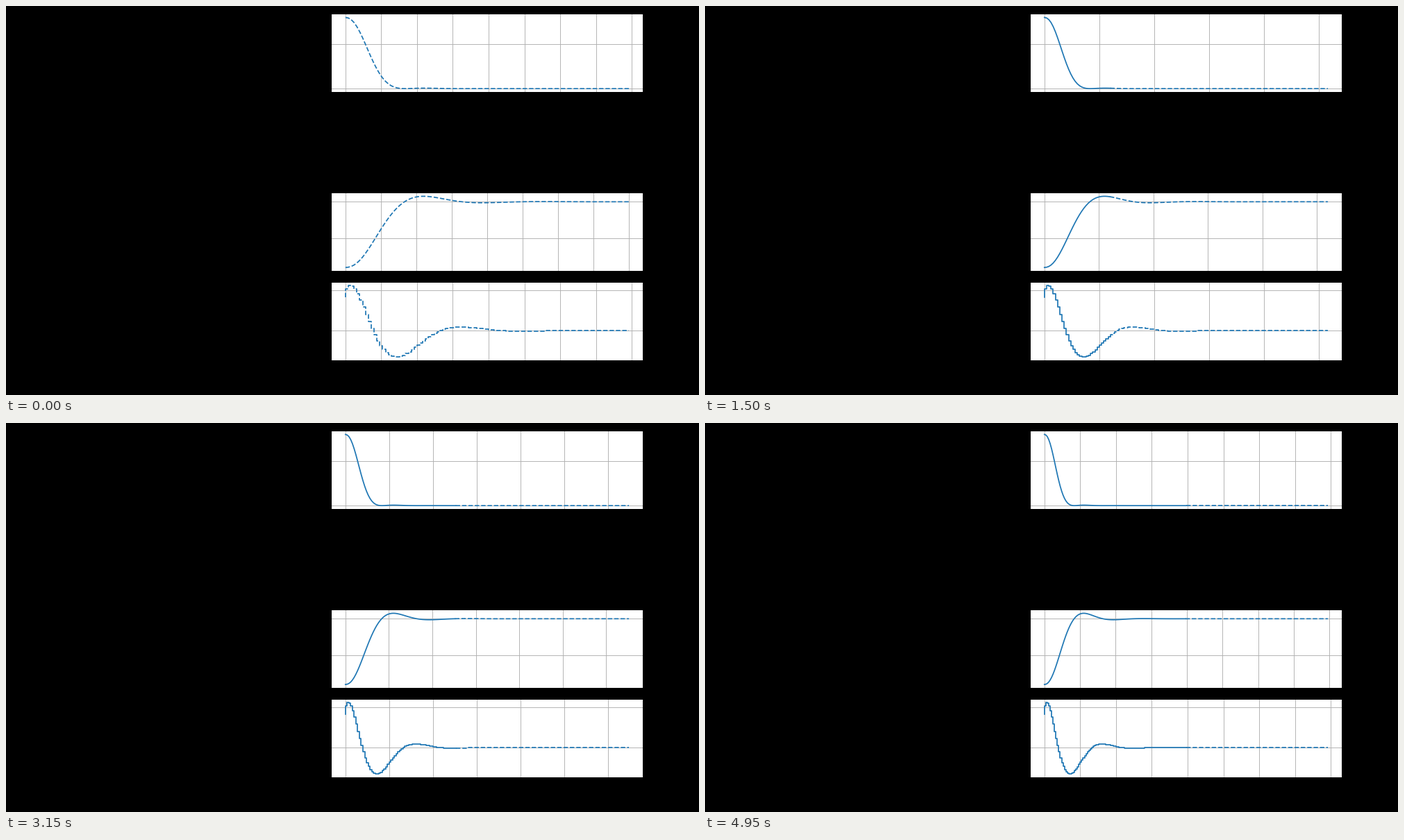
Recreate the animation shown at these times as a matplotlib script. Size 998x561 px, loop 5 s.

```python
import numpy as np
import matplotlib.pyplot as plt
from matplotlib.animation import FuncAnimation
from matplotlib.ticker import MaxNLocator

W, H, DPI = 998, 561, 64
FRAMES, INTERVAL = 100, 50
HORIZON = 100
DT, GRAVITY = 0.04, 9.8
X0, U0 = -1.79, 0.82
RATE_WEIGHT = 10.0


def pt(px):
    return px * 72 / DPI


def feedback_gain(A, B):
    """Steady gain that minimises the sum of x^2 + RATE_WEIGHT * du^2."""
    Q = np.diag([1.0, 0.0, 0.0])
    P = Q.copy()
    for _ in range(600):
        K = (B @ P @ A) / (RATE_WEIGHT + B @ P @ B)
        P = Q + A.T @ P @ (A - np.outer(B, K))
    return K


def simulate(steps):
    """Double integrator whose input is moved by optimal increments."""
    h, s = 0.5 * GRAVITY * DT**2, GRAVITY * DT
    A = np.array([[1, DT, h], [0, 1, s], [0, 0, 1]])
    B = np.array([h, s, 1])
    K = feedback_gain(A, B)
    z = np.array([X0, 0.0, U0])
    x, u = np.zeros(steps), np.zeros(steps)
    for k in range(steps):
        du = -K @ z if k else 0.0
        x[k], u[k] = z[0], z[2] + du
        z = A @ z + B * du
    return x, u


class Panel:
    def __init__(self, fig, top, data, count, yticks, style="default"):
        left, width, height = 468.4, 449.05, 112.9
        self.data, self.count = data, count
        self.ax = ax = fig.add_axes(
            [left / W, 1 - (top + height) / H, width / W, height / H])
        lo, hi = data.min(), data.max()
        pad = 0.05 * (hi - lo)
        ax.set_ylim(lo - pad, hi + pad)
        ax.set_yticks(yticks)
        ax.xaxis.set_major_locator(MaxNLocator(9, steps=[1, 2, 2.5, 5, 10]))
        ax.tick_params(length=0, labelleft=False, labelbottom=False)
        ax.grid(color="#b0b0b0", linewidth=pt(0.92))
        for spine in ax.spines.values():
            spine.set_linewidth(pt(1))
        self.past, self.plan = (
            ax.plot([], [], ls, color="#1f77b4", lw=pt(1.73),
                    drawstyle=style)[0] for ls in ("-", "--"))

    def update(self, n):
        end = n + self.count
        for line, a, b in ((self.past, 0, n + 1), (self.plan, n, end)):
            line.set_data(DT * np.arange(a, b), self.data[a:b])
        span = DT * (end - 1)
        self.ax.set_xlim(-0.05 * span, 1.05 * span)
        return self.past, self.plan


x, u = simulate(FRAMES + HORIZON)
fig = plt.figure(figsize=(W / DPI, H / DPI), dpi=DPI, facecolor="black")
panels = [
    Panel(fig, 11.4, x**2, HORIZON, [0, 2]),
    Panel(fig, 269.3, x, HORIZON + 1, [-1, 0]),
    Panel(fig, 398.3, u, HORIZON, [0, 1], style="steps-pre"),
]


def draw(n):
    return [line for panel in panels for line in panel.update(n)]


anim = FuncAnimation(fig, draw, frames=FRAMES, interval=INTERVAL,
                     repeat=True, repeat_delay=0, blit=False)
plt.show()
```
